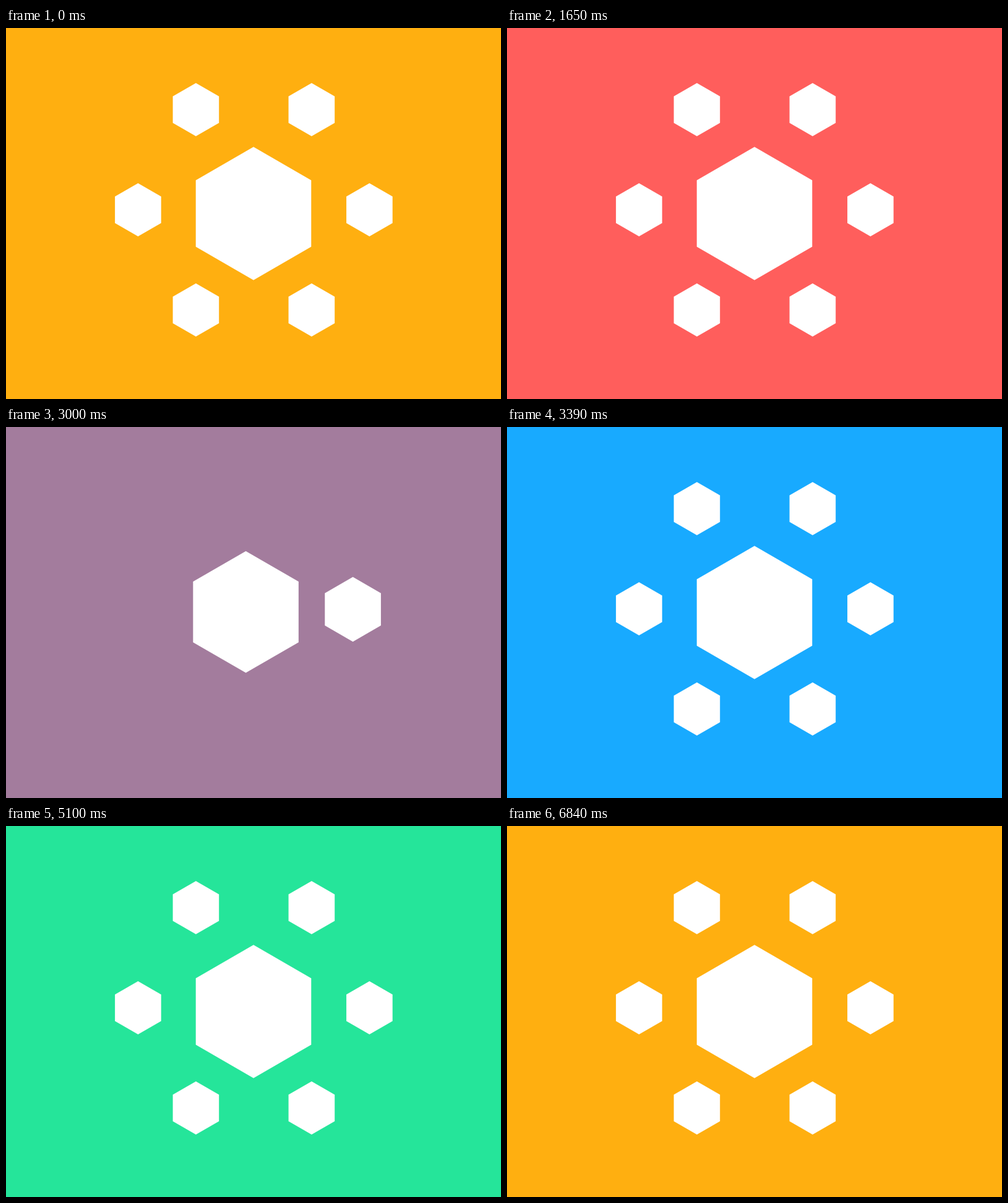
Write an HTML page with a canvas that moves like this. It is 800 px wide and 600 px high and loops after 6930 ms.

```html
<!DOCTYPE html>
<html lang="en">
<head>
<meta charset="utf-8">
<title>Hexagons</title>
<style>
  html, body { margin: 0; width: 100%; height: 100%; overflow: hidden; background: #ffaf10; }
  canvas { display: block; width: 800px; height: 600px; }
</style>
</head>
<body>
<canvas id="stage" width="800" height="600"></canvas>
<script>
const ctx = document.getElementById('stage').getContext('2d');
const STEP = 30, STEPS = 231;
const RADIUS = 107.7, SMALL = 0.4, PEAK = 0.5;
const CENTRE = { x: 400, y: 290 };

// Clockwise from the top left.
const SLOTS = [[-1, -1], [1, -1], [2, 0], [1, 1], [-1, 1], [-2, 0]]
  .map(([x, y]) => ({ x: 400.4 + x * 93.5, y: 290 + y * 162 }));

const YELLOW = [255, 175, 16], RED = [255, 94, 92], BLUE = [24, 170, 255], GREEN = [37, 229, 154];

const clamp = v => Math.min(1, Math.max(0, v));
const mix = (a, b, p) => a + (b - a) * p;

function bezier(x1, x2) {
  return x => {
    if (x <= 0 || x >= 1) return clamp(x);
    let lo = 0, hi = 1, u;
    for (let i = 0; i < 24; i++) {
      u = (lo + hi) / 2;
      const at = 3 * x1 * u * (1 - u) ** 2 + 3 * x2 * u * u * (1 - u) + u ** 3;
      if (at < x) lo = u; else hi = u;
    }
    return u * u * (3 - 2 * u);
  };
}
const soft = bezier(0.2, 0.8);
const strong = bezier(0.507, 0.507);

// tap: first ripple step, swap: step at which the hexagons start to trade places.
const ROUNDS = [
  { tap: 24, swap: 34, slot: 0, from: YELLOW, to: RED, leave: strong },
  { tap: 82, swap: 92, slot: 5, from: RED, to: BLUE, leave: soft },
  { tap: 140, swap: 149, slot: 4, from: BLUE, to: GREEN, leave: strong },
  { tap: 197, swap: 207, slot: 0, from: GREEN, to: YELLOW, leave: strong }
];

// Scaling pivots slightly above the middle of the shape.
function hexagon(pos, scale) {
  if (scale <= 0) return;
  const r = RADIUS * scale, cy = pos.y + 10 * scale;
  ctx.beginPath();
  for (let i = 0; i < 6; i++) {
    const a = (i - 0.5) * Math.PI / 3;
    ctx.lineTo(pos.x + r * Math.cos(a), cy + r * Math.sin(a));
  }
  ctx.fill();
}

function travel(a, b, p) {
  return { x: mix(a.x, b.x, p), y: mix(a.y, b.y, p) };
}

function ripple(pos, p) {
  if (p <= 0 || p >= 1) return;
  const outer = mix(40, 56.5, 1 - (1 - p) ** 2), width = 7 * (1 - p);
  ctx.lineWidth = width;
  ctx.beginPath();
  ctx.arc(pos.x - 0.5, pos.y + 3.7, outer - width / 2, 0, Math.PI * 2);
  ctx.stroke();
}

const shrink = n => SMALL * (1 - clamp(n / 3));
const grow = n => n < 3 ? PEAK * clamp(n / 3) : mix(PEAK, SMALL, clamp((n - 3) / 2));

function draw(step) {
  const round = ROUNDS.findLast(r => step >= r.tap) || ROUNDS[0];
  const n = Math.max(0, step - round.swap);
  const tone = clamp((n - 4) / 10);
  const rgb = round.from.map((c, i) => Math.round(mix(c, round.to[i], tone)));
  ctx.fillStyle = `rgb(${rgb})`;
  ctx.fillRect(0, 0, 800, 600);
  ctx.fillStyle = ctx.strokeStyle = '#fff';

  const start = SLOTS[round.slot], end = SLOTS[(round.slot + 3) % 6];
  const p = n / 10, size = soft(p);
  for (let k = 1; k <= 6; k++) {
    const pos = SLOTS[(round.slot + k) % 6];
    if (k < 6) hexagon(pos, shrink(n - k));
    if (k !== 3) hexagon(pos, grow(n - 10 - k));
  }
  hexagon(travel(CENTRE, end, round.leave(p)), mix(1, SMALL, size));
  hexagon(travel(start, CENTRE, strong(p)), mix(SMALL, 1, size));
  ripple(start, (step - round.tap + 1) / 7);
}

const begin = performance.now();
function tick() {
  draw(Math.floor((performance.now() - begin) / STEP) % STEPS);
  requestAnimationFrame(tick);
}
tick();
</script>
</body>
</html>
```
